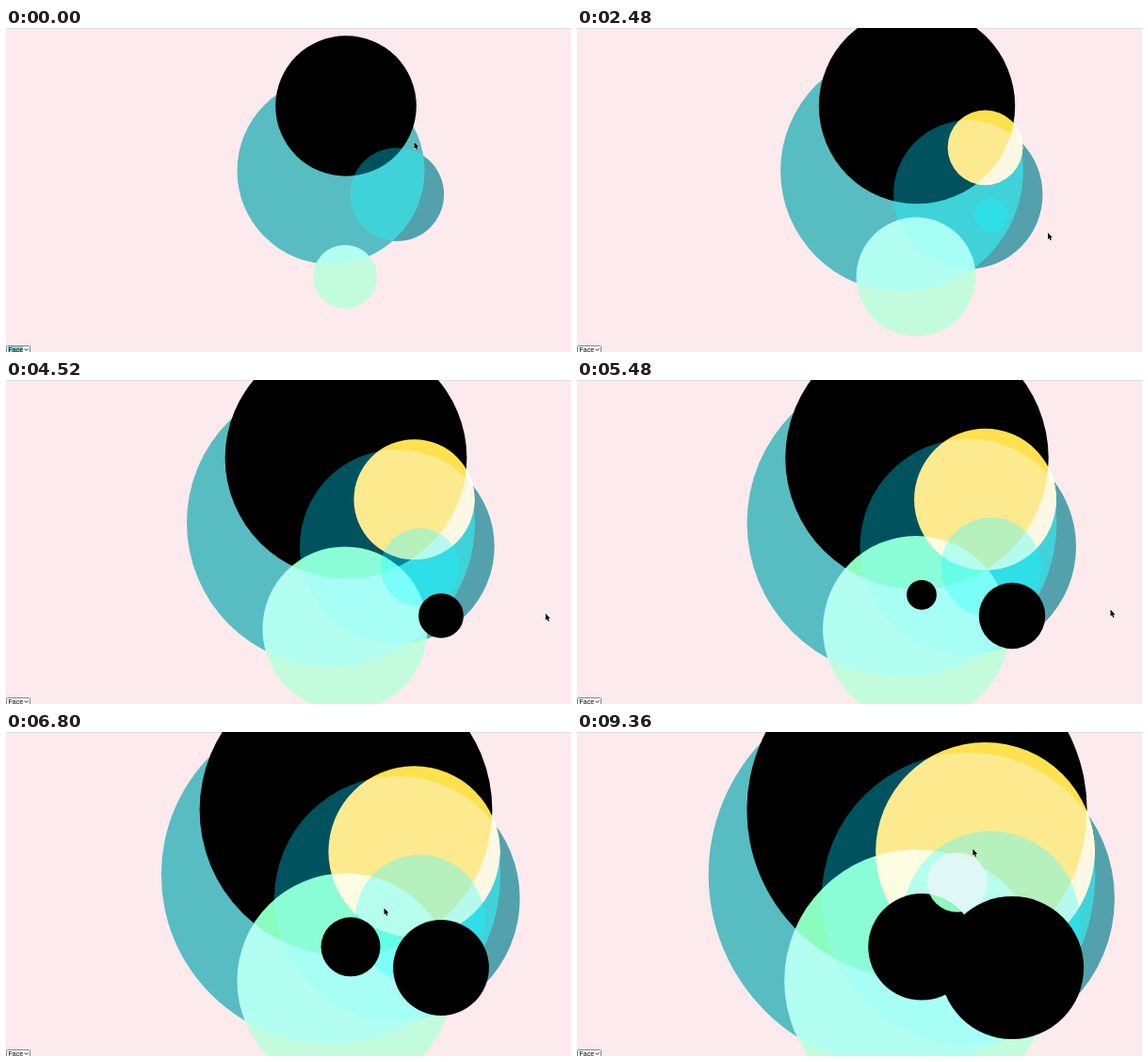
Write an HTML page with a canvas that moves like this. It is 600 px wide and 345 px high and loops after 9.4 s.

```html
<!DOCTYPE html>
<html lang="en">
<head>
<meta charset="utf-8">
<title>Growing circles</title>
<style>
  html, body { margin: 0; width: 100%; height: 100%; overflow: hidden; background: #fdeaec; }
  canvas { display: block; width: 600px; height: 345px; }
</style>
</head>
<body>
<canvas id="stage" width="600" height="345"></canvas>
<script>
const W = 600, H = 345, LOOP = 9400, STEP = 40;
const view = document.getElementById('stage').getContext('2d');
const layer = document.createElement('canvas');
layer.width = W;
layer.height = H;
const glow = layer.getContext('2d');

// Every circle grows at the same steady rate, with one short stall.
const RATE = 0.01185, STALL_AT = 6850, STALL = 430;
const growth = t => RATE * (t - Math.min(STALL, Math.max(0, t - STALL_AT)));

// r is the radius at time zero, so later circles start below zero.
// solid paints over, light screens, dim scales the result, veil scales the backdrop.
const BLACK = { solid: '#000', veil: '#000' };
const TINT = 'rgb(184,255,255)';
const CIRCLES = [
  { x: 345, y: 152, r: 99.5, solid: 'rgb(88,188,195)', veil: '#000' },
  { x: 361, y: 83, r: 74.8, ...BLACK },
  { x: 415.3, y: 177.3, r: 49.8, dim: TINT, light: 'rgb(0,82,94)', veil: 'rgb(83,86,84)' },
  { x: 360, y: 265, r: 34, light: 'rgb(138,252,190)', veil: 'rgb(57,0,32)' },
  { x: 433.5, y: 127.3, r: 10.5, born: 240, light: 'rgb(255,227,78)', dim: 'rgb(253,253,253)' },
  { x: 439.5, y: 199.5, r: -11.8, born: 2080, dim: TINT, light: 'rgb(0,75,103)' },
  { x: 462, y: 251, r: -29.7, born: 3960, ...BLACK },
  { x: 366, y: 228.8, r: -49.1, born: 5120, ...BLACK },
  { x: 403.8, y: 160, r: -74, born: 7600, light: 'rgb(143,255,190)', dim: 'rgb(255,248,252)' }
];

// Pointer stops: [time, x, y]
const POINTER = [
  [0, 433, 121], [360, 433, 123], [1300, 640, 165], [2000, 440, 197], [3160, 600, 252],
  [3960, 462, 249], [4400, 590, 250], [5100, 366, 227], [5600, 600, 247], [6800, 401, 187],
  [7600, 404, 157], [8000, 500, -20], [8500, 560, 145], [LOOP, 419, 124]
];

function pointerAt(t) {
  const n = POINTER.findIndex(stop => stop[0] > t);
  const [t0, x0, y0] = POINTER[n - 1], [t1, x1, y1] = POINTER[n];
  const u = (t - t0) / (t1 - t0), k = u * u * (3 - 2 * u);
  return [x0 + (x1 - x0) * k, y0 + (y1 - y0) * k];
}

function box(ctx, color, x, y, w, h) {
  ctx.globalCompositeOperation = 'source-over';
  ctx.fillStyle = color;
  ctx.fillRect(x, y, w, h);
}

function disc(ctx, c, r, color, mode) {
  if (!color) return;
  ctx.globalCompositeOperation = mode;
  ctx.fillStyle = color;
  ctx.beginPath();
  ctx.arc(c.x, c.y, r, 0, Math.PI * 2);
  ctx.fill();
}

function drawCircles(t) {
  const grown = growth(t);
  box(view, '#fdeaec', 0, 0, W, H);
  box(view, '#dedcdd', 0, 0, W, 1);
  box(glow, '#000', 0, 0, W, H);
  for (const c of CIRCLES) {
    if (t < (c.born || 0)) continue;
    const r = c.r + grown;
    disc(view, c, r, c.veil, 'multiply');
    disc(glow, c, r, c.solid, 'source-over');
    disc(glow, c, r, c.light, 'screen');
    disc(glow, c, r, c.dim, 'multiply');
  }
  view.globalCompositeOperation = 'lighter';
  view.drawImage(layer, 0, 0);
  view.globalCompositeOperation = 'source-over';
}

function drawMenu(focused) {
  view.fillStyle = '#fff';
  view.strokeStyle = '#858585';
  view.lineWidth = 1;
  view.beginPath();
  view.roundRect(0.5, 338.5, 25, 9, 1);
  view.fill();
  view.stroke();
  if (focused) box(view, '#8fd2d8', 2, 339, 16, 6);
  view.fillStyle = '#000';
  view.font = '7px "Liberation Sans", Arial, sans-serif';
  view.fillText('Face', 2.5, 345.3);
  view.strokeStyle = '#111';
  view.beginPath();
  view.moveTo(19.7, 341.5);
  view.lineTo(21.5, 343.3);
  view.lineTo(23.3, 341.5);
  view.stroke();
}

function drawPointer(t) {
  view.save();
  view.translate(...pointerAt(t));
  view.beginPath();
  [[0.5, 0.5], [0.5, 7.5], [2.1, 6.2], [3.2, 8.8], [4.4, 8.3], [3.4, 5.8], [5.4, 5.6]]
    .forEach(([x, y]) => view.lineTo(x, y));
  view.closePath();
  view.lineJoin = 'round';
  view.lineWidth = 1;
  view.strokeStyle = '#fff';
  view.stroke();
  view.fillStyle = '#000';
  view.fill();
  view.restore();
}

const start = performance.now();

function frame() {
  const t = Math.floor(((performance.now() - start) % LOOP) / STEP) * STEP;
  drawCircles(t);
  drawMenu(t < 2100);
  drawPointer(t);
  requestAnimationFrame(frame);
}
frame();
</script>
</body>
</html>
```
